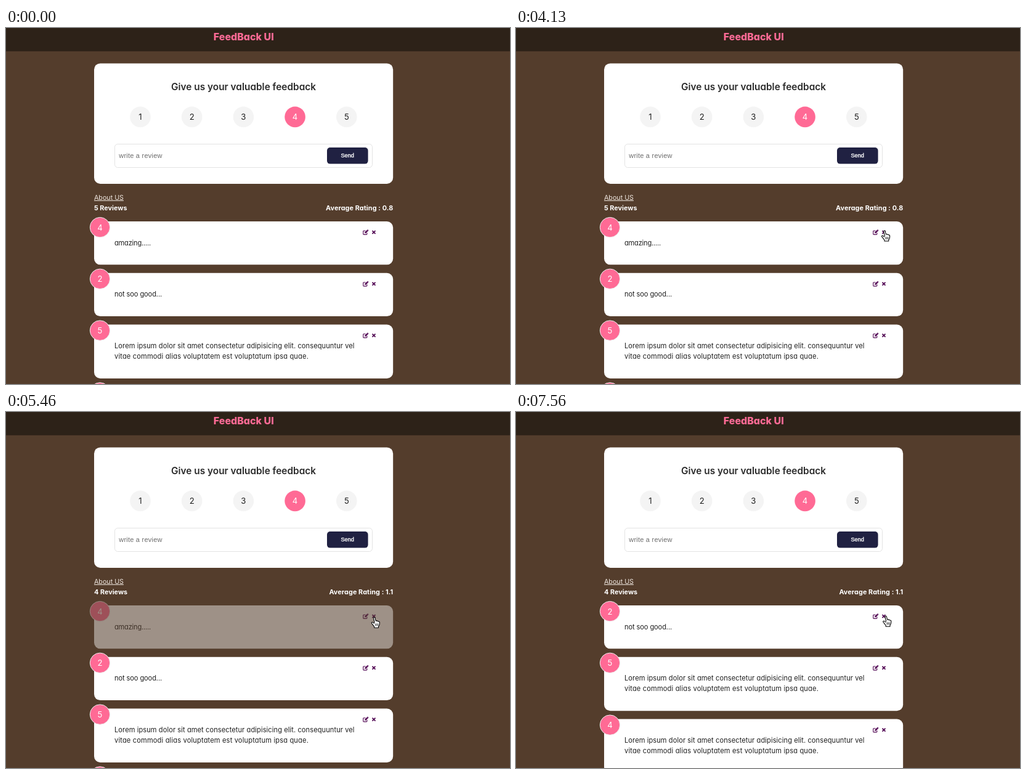
Recreate the animation shown at these times as an HTML page. Size 818x578 px, loop 8 s.

```html
<!DOCTYPE html>
<html lang="en">
<head>
<meta charset="utf-8">
<title>Feedback UI</title>
<style>
  html, body { margin: 0; width: 100%; height: 100%; overflow: hidden; background: #543d2c; }
  svg { display: block; width: 818px; height: 578px; }
  text { font: 400 11.09px Inter, "Open Sans", sans-serif; font-feature-settings: "cv11"; fill: #202020; white-space: pre; }
  .mid { text-anchor: middle; }
  .end { text-anchor: end; }
  .brand { font-size: 16px; font-weight: 800; fill: #ff6a95; }
  .title { font-size: 15.4px; font-weight: 600; fill: #2b2b2b; }
  .num { font-size: 13.2px; }
  .light { fill: #fff; }
  .stat { font-size: 10.85px; font-weight: 700; fill: #fff; }
  .link { font-size: 10.7px; fill: #eee6df; text-decoration: underline; }
  .field { font-family: "Liberation Sans", Arial, sans-serif; fill: #6c6c6c; }
  .send { font-family: "Liberation Sans", Arial, sans-serif; font-size: 9.2px; fill: #fff; stroke: #fff; stroke-width: .35; }
</style>
</head>
<body>
<svg id="stage" viewBox="0 0 818 578" xmlns="http://www.w3.org/2000/svg"></svg>
<script>
const LOOP = 8000, STEP = 70;
const PINK = '#ff6a95', PURPLE = '#530a55';
const SHORT = 83.75, LONG = 100.8, GAP = 13.4;
const LOREM = [
  ['Lorem ipsum dolor sit amet consectetur adipisicing elit. consequuntur vel', 0.08],
  ['vitae commodi alias voluptatem est voluptatum ipsa quae.', 0.16]
];

const text = (x, y, cls, str, gap = 0) =>
  `<text x="${x}" y="${y}" class="${cls}" letter-spacing="${gap}">${str}</text>`;

const box = (x, y, w, h, r, fill, extra = '') =>
  `<rect x="${x}" y="${y}" width="${w}" height="${h}" rx="${r}" fill="${fill}" ${extra}/>`;

const icons = `<g fill="none" stroke="${PURPLE}">
  <path d="M440.6 15.2H437.7Q436.8 15.2 436.8 16.1V20.5Q436.8 21.4 437.7 21.4H442Q442.9 21.4 442.9 20.5V18.6" stroke-width="1.15"/>
  <path d="M439.4 19.2L439.7 17.3L443.3 13.7L444.9 15.3L441.3 18.9Z" fill="${PURPLE}" stroke-width=".3"/>
  <path d="M443.8 13.2L445.4 14.8" stroke-width="1"/>
  <path d="M451.5 15.1L456.5 20.1M456.5 15.1L451.5 20.1" stroke-width="1.8"/>
</g>`;

// One review card, placed by its top edge; each line is [string, letter gap].
function card(top, rating, lines) {
  const height = (lines.length > 1 ? LONG : SHORT) - GAP;
  return `<g transform="translate(143 ${top})">
    ${box(0, 0, 485.2, height, 10, '#fff')}
    <circle cx="9.5" cy="9.6" r="16.2" fill="${PINK}" stroke="#eee" stroke-width="1"/>
    ${text(9.5, 14.6, 'num mid light', rating)}
    ${icons}
    ${lines.map(([str, gap], i) => text(33, 38.7 + i * 17, '', str, gap)).join('')}
  </g>`;
}

const first = card(314, 4, [['amazing.....', -0.2]]);
const bad = top => card(top, 2, [['not soo good...', -0.1]]);
const lorem = (top, rating) => card(top, rating, LOREM);

const choices = [1, 2, 3, 4, 5].map(n => {
  const x = 218 + (n - 1) * 83.7, on = n === 4;
  return `<circle cx="${x}" cy="144.4" r="16.8" fill="${on ? PINK : '#f4f4f4'}"/>` +
    text(x, 149.2, on ? 'num mid light' : 'num mid', n);
}).join('');

const stats = (count, average) =>
  text(143, 295.7, 'stat', `${count} Reviews`) +
  text(628.3, 295.7, 'stat end', `Average Rating : ${average}`, 0.09);

const stage = document.getElementById('stage');
stage.innerHTML = `
  ${box(0, 0, 818, 578, 0, '#543d2c')}
  ${box(0, 0, 818, 37.8, 0, '#2d2218')}
  ${text(385.8, 20.2, 'brand mid', 'FeedBack UI')}
  ${box(143, 57.4, 485.2, 195.6, 10, '#fff')}
  ${text(385.5, 101, 'title mid', 'Give us your valuable feedback')}
  ${choices}
  ${box(176.5, 188.5, 418, 38, 5, '#fff', 'stroke="#dcdcdc" stroke-width=".8"')}
  ${text(183.2, 210.8, 'field', 'write a review', 0.2)}
  ${box(521, 194, 66.6, 26.6, 5, '#202142')}
  ${text(554.2, 210.3, 'send mid', 'Send')}
  ${text(143, 278.7, 'link', 'About US')}
  <g id="five">${stats(5, '0.8')}</g>
  <g id="four">${stats(4, '1.1')}</g>
  <g id="before">
    <g id="first">${first}</g>
    ${bad(314 + SHORT)}${lorem(314 + 2 * SHORT, 5)}${lorem(314 + 2 * SHORT + LONG, 4)}
  </g>
  <g id="after">${bad(314)}${lorem(314 + SHORT, 5)}${lorem(314 + SHORT + LONG, 4)}</g>
  <path id="arrow" d="M0 0V14.6L3.3 11.6L5.7 17.3L8 16.3L5.6 10.8H9.9Z"
    fill="#000" stroke="#fff" stroke-width="1.6" stroke-linejoin="round" paint-order="stroke"/>
  <g id="hand" stroke="#000" stroke-linecap="round" stroke-linejoin="round">
    <path d="M4.9 10.2L3.3 8.8C1.9 7.6 .1 8.6 1 10L3.2 12.8Q4 14.4 5.2 15.4V17.2H12V15.4Q13.8 13.2 13.8 10.6V8.4Q13.6 6.9 12.2 7.3Q11.7 6.1 10.1 6.6Q9.4 5.5 7.7 6.1L6.4 1.3C5.9 -.4 3.6 .1 4 1.9L5.7 8.8"
      fill="#fff" stroke-width="1.1"/>
    <path d="M7.2 10.8V14M9.2 10.8V14M11.2 10.8V14" stroke-width=".8"/>
  </g>`;

const $ = id => document.getElementById(id);
const show = (id, on) => $(id).setAttribute('display', on ? 'inline' : 'none');

// Pointer path: time, x, y
const path = [
  [700, 405.5, 501], [1050, 560, 271], [1260, 632.5, 353], [1400, 632.5, 353],
  [1470, 627.8, 352.3], [2240, 597.8, 330.3], [2450, 595.7, 332.3], [4060, 595.7, 332.3],
  [4130, 592.8, 328.8], [4270, 596, 321.6], [4340, 596, 321.6], [4690, 592.5, 333],
  [5950, 592.5, 333], [6020, 582, 342], [6300, 467, 362], [6580, 560, 310],
  [6790, 609, 330.3], [6860, 609, 330.3], [7210, 591.5, 329.8], [7350, 591.5, 329.8],
  [7560, 595, 331]
];

function pointerAt(t) {
  const i = path.findIndex(k => k[0] > t);
  if (i < 1) return path[i < 0 ? path.length - 1 : 0].slice(1);
  const [a, b] = [path[i - 1], path[i]];
  const f = (t - a[0]) / (b[0] - a[0]);
  return [a[1] + (b[1] - a[1]) * f, a[2] + (b[2] - a[2]) * f];
}

function draw(now) {
  const t = Math.floor((now % LOOP) / STEP) * STEP;
  const deleted = t >= 5320, gone = t >= 5600;
  show('five', !deleted);
  show('four', deleted);
  show('before', !gone);
  show('after', gone);
  const fade = deleted ? 0.88 - 0.45 * (t - 5320) / 140 : 1;
  $('first').setAttribute('opacity', Math.max(0, fade));

  const overButton = (t >= 4130 && t < 6020) || t >= 7070;
  const [x, y] = pointerAt(t);
  for (const id of ['arrow', 'hand']) {
    show(id, t >= 700 && (id === 'hand') === overButton);
    $(id).setAttribute('transform', `translate(${x} ${y})`);
  }
}

const start = performance.now();
function tick() {
  draw(performance.now() - start);
  requestAnimationFrame(tick);
}
tick();
</script>
</body>
</html>
```
